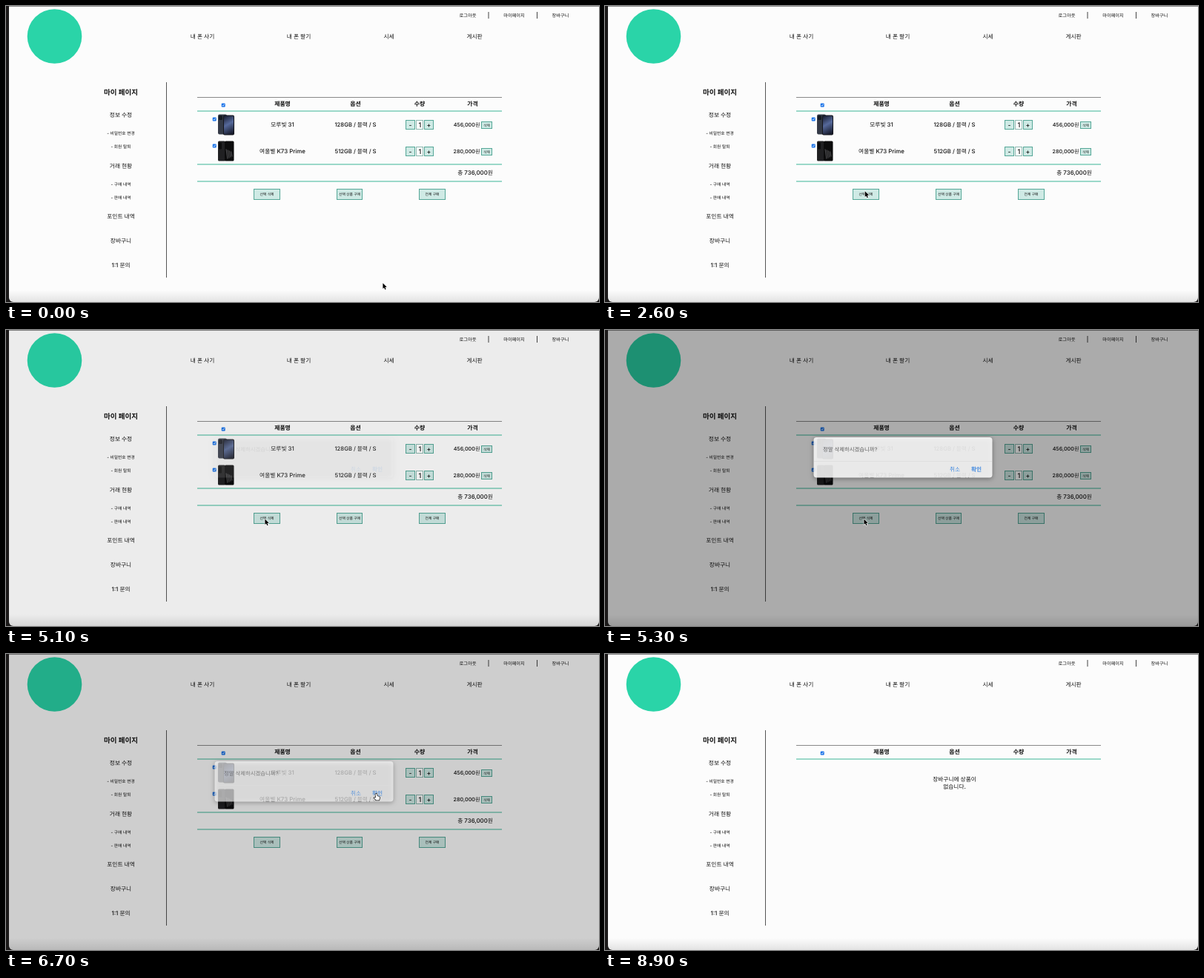
An HTML page with a canvas for the animation above (9500 ms loop, 800x400 px).

```html
<!DOCTYPE html>
<html lang="ko">
<head>
<meta charset="utf-8">
<title>장바구니</title>
<style>
html, body { margin: 0; width: 100%; height: 100%; overflow: hidden; background: #1b1919; }
canvas { display: block; width: 800px; height: 400px; }
</style>
</head>
<body>
<canvas id="stage"></canvas>
<script>
const LOOP = 9500, STEP = 100;
const INK = '#111', LINE = '#3cb698', TINT = '#cfeae5', EDGE = '#55a797', BLUE = '#1a73e8';
const LATIN = 'Inter, "Open Sans", sans-serif';
const HANGUL = '"Noto Sans CJK KR", "Noto Sans CJK", sans-serif';

const canvas = document.getElementById('stage');
const ctx = canvas.getContext('2d');
const ratio = window.devicePixelRatio || 1;
canvas.width = 800 * ratio;
canvas.height = 400 * ratio;

const clamp = v => Math.max(0, Math.min(1, v));
const smooth = (t, from, to) => {
  const u = clamp((t - from) / (to - from));
  return u * u * (3 - 2 * u);
};

// Pointer tip: time, x, y
const path = [
  [0, 508, 374], [400, 449, 308], [600, 449, 308], [1500, 396, 249],
  [1800, 396, 249], [2800, 345, 250], [3600, 342.5, 249], [4200, 350, 259],
  [4700, 349, 255], [5400, 349, 255], [6300, 499, 189], [7700, 499, 189],
  [8300, 481, 143], [8400, 481, 143], [8700, 477, 0]
];

function pointerAt(t) {
  let i = 0;
  while (i < path.length - 2 && t > path[i + 1][0]) i++;
  const [t0, x0, y0] = path[i], [t1, x1, y1] = path[i + 1];
  const u = smooth(t, t0, t1);
  return [x0 + (x1 - x0) * u, y0 + (y1 - y0) * u];
}

function rect(x, y, w, h, fill, stroke) {
  ctx.fillStyle = fill;
  ctx.fillRect(x, y, w, h);
  if (stroke) {
    ctx.strokeStyle = stroke;
    ctx.lineWidth = 1;
    ctx.strokeRect(x + .5, y + .5, w - 1, h - 1);
  }
}

function round(x, y, w, h, r, fill) {
  ctx.beginPath();
  ctx.roundRect(x, y, w, h, r);
  ctx.fillStyle = fill;
  ctx.fill();
}

function poly(points, fill, stroke, width) {
  ctx.beginPath();
  points.forEach(([x, y]) => ctx.lineTo(x, y));
  ctx.closePath();
  ctx.lineJoin = 'round';
  ctx.lineWidth = width;
  ctx.strokeStyle = stroke;
  ctx.stroke();
  ctx.fillStyle = fill;
  ctx.fill();
}

// Hangul runs are set slightly smaller than Latin runs; y is the middle of the line.
function text(str, x, y, size = 8.2, { weight = 500, color = INK, align = .5 } = {}) {
  const runs = str.match(/[가-힣]+|[^가-힣]+/g).map(s => {
    const font = /[가-힣]/.test(s)
      ? `${weight} ${size * .94}px ${HANGUL}`
      : `${weight} ${size * .96}px ${LATIN}`;
    ctx.font = font;
    return { s, font, w: ctx.measureText(s).width };
  });
  x -= align * runs.reduce((sum, r) => sum + r.w, 0);
  ctx.fillStyle = color;
  for (const r of runs) {
    ctx.font = r.font;
    ctx.fillText(r.s, x, y + size * .35);
    x += r.w;
  }
}

function checkbox(x, y) {
  round(x - 2.5, y - 2.5, 5, 5, 1, BLUE);
  ctx.beginPath();
  ctx.moveTo(x - 1.4, y);
  ctx.lineTo(x - .4, y + 1.1);
  ctx.lineTo(x + 1.5, y - 1.3);
  ctx.lineWidth = .8;
  ctx.strokeStyle = '#fff';
  ctx.stroke();
}

function button(label, x, y, w, h, size) {
  rect(x, y, w, h, TINT, EDGE);
  text(label, x + w / 2, y + h / 2, size);
}

function pairPhoto(x, y) {
  round(x, y, 12, 27, 2, '#343a47');
  round(x + 1, y + 1.5, 5, 6, 1.5, '#171a22');
  round(x + 7, y + 1, 15, 27, 2, '#15161c');
  const glow = ctx.createLinearGradient(x + 8, y + 4, x + 20, y + 25);
  glow.addColorStop(0, '#20263d');
  glow.addColorStop(.45, '#56699b');
  glow.addColorStop(1, '#171b2c');
  round(x + 8, y + 2, 13, 25, 1.5, glow);
}

function darkPhoto(x, y) {
  round(x, y, 10, 27, 1.5, '#202022');
  round(x + 1, y + 2, 4, 9, 1, '#0b0b0c');
  round(x + 9, y, 12.5, 27, 1.5, '#0c0c0d');
  ctx.strokeStyle = '#77777a';
  ctx.lineWidth = .7;
  ctx.beginPath();
  for (let i = 0; i < 4; i++) {
    ctx.moveTo(x + 11 + i * 2.2, y + 11 + i);
    ctx.lineTo(x + 13 + i * 2, y + 24 - i);
  }
  ctx.stroke();
}

function row(y, photo, name, option, price) {
  checkbox(281.2, y - 7);
  photo(286, y - 13.5);
  text(name, 373, y);
  text(option, 471.5, y, 8);
  button('-', 539, y - 6, 13, 13, 9);
  rect(553, y - 6, 10, 13, '#fff', '#8cb8b0');
  text('1', 558.5, y + .5, 9.5);
  button('+', 564, y - 6, 13, 13, 9);
  text(price, 621.5, y, 7.5);
  button('삭제', 641, y - 4, 15, 10, 4.9);
}

function frame() {
  rect(0, 0, 800, 400, '#1b1919');
  rect(4, 0, 796, 1, '#8a8a8a');
  round(4, 1, 796, 399, [0, 0, 6, 6], '#fcfcfc');
  const shade = ctx.createLinearGradient(0, 384, 0, 400);
  shade.addColorStop(0, 'rgba(0,0,0,0)');
  shade.addColorStop(1, 'rgba(0,0,0,.1)');
  round(4, 384, 796, 16, [0, 0, 6, 6], shade);
}

function header() {
  ctx.beginPath();
  ctx.arc(65.5, 41, 36.8, 0, Math.PI * 2);
  ctx.fillStyle = '#2ad4a8';
  ctx.fill();

  text('로그아웃', 623, 12.5, 6.6);
  text('마이페이지', 685.5, 12.5, 6.6);
  text('장바구니', 748, 12.5, 6.6);
  rect(650.5, 8, 1, 9, '#444');
  rect(716, 8, 1, 9, '#444');

  text('내 폰 사기', 265, 41);
  text('내 폰 팔기', 395, 41);
  text('시세', 516.5, 41);
  text('게시판', 632, 41);
}

function sidebar() {
  text('마이 페이지', 155, 116.5, 10.1, { weight: 700 });
  [['정보 수정', 147], ['거래 현황', 216], ['포인트 내역', 284.5], ['장바구니', 317.5], ['1:1 문의', 350.5]]
    .forEach(([s, y]) => text(s, 155, y));
  [['- 비밀번호 변경', 172], ['- 회원 탈퇴', 190], ['- 구매 내역', 241], ['- 판매 내역', 259]]
    .forEach(([s, y]) => text(s, 155, y, 6.1));
  rect(216, 103, 1, 264, '#555');
}

function cart(full) {
  rect(258, 123, 411, 1, '#888');
  rect(258, 141.5, 411, 1, LINE);
  checkbox(293.2, 134);
  [['제품명', 373], ['옵션', 471.5], ['수량', 558], ['가격', 629.5]]
    .forEach(([s, x]) => text(s, x, 132.5, 8.4, { weight: 700 }));

  if (!full) {
    text('장바구니에 상품이', 471.5, 169.5);
    text('없습니다.', 471.5, 179.5);
    return;
  }
  row(160, pairPhoto, '모루빛 31', '128GB / 블랙 / S', '456,000원');
  row(196, darkPhoto, '여울별 K73 Prime', '512GB / 블랙 / S', '280,000원');
  rect(258, 213.5, 411, 1, LINE);
  text('총 736,000원', 633, 225.5, 8.2);
  rect(258, 236.5, 411, 1, LINE);
  button('선택 삭제', 334, 247, 36, 15, 5.1);
  button('선택 상품 구매', 446, 247, 35, 15, 5.1);
  button('전체 구매', 557, 247, 36, 15, 5.1);
}

function dialog(alpha) {
  if (alpha <= 0) return;
  ctx.save();
  ctx.globalAlpha = alpha;
  ctx.shadowColor = 'rgba(0,0,0,.45)';
  ctx.shadowBlur = 6 * ratio;
  ctx.shadowOffsetY = 1.5 * ratio;
  round(281.5, 145, 241, 54.5, 4, '#fff');
  ctx.shadowColor = 'transparent';
  rect(282, 177, 240, 1, '#dedede');
  text('정말 삭제하시겠습니까?', 294, 161.5, 7.8, { weight: 400, color: '#444', align: 0 });
  text('취소', 472, 188.5, 8.1, { color: '#2277dd' });
  text('확인', 501, 188.5, 8.1, { weight: 700, color: '#2277dd' });
  ctx.restore();
}

function pointer(t) {
  if (t >= 8800) return;
  const [x, y] = pointerAt(t);
  ctx.save();
  ctx.translate(x, y);
  if (t >= 6200 && t < 7100) {
    poly([[0, 0], [1.2, 0], [1.8, 3], [4.6, 3.8], [5.2, 5], [4.4, 8.6], [.4, 8.6],
      [-2.3, 5.4], [-1.7, 4.6], [0, 5.4], [-.6, .6]], '#fff', '#111', 1.4);
  } else {
    poly([[.4, .4], [.4, 8], [2.1, 6.5], [3.3, 9.3], [4.6, 8.7], [3.4, 6], [5.7, 5.8]], '#000', '#fff', 1.2);
  }
  ctx.restore();
}

function draw(t) {
  ctx.setTransform(ratio, 0, 0, ratio, 0, 0);
  ctx.textRendering = 'geometricPrecision';
  frame();
  header();
  sidebar();
  cart(t < 7100);

  const open = smooth(t, 5000, 5380);
  const dim = .365 * open * (1 - smooth(t, 6600, 6800));
  if (dim > 0) round(4, 0, 796, 400, [0, 0, 6, 6], `rgba(0,0,0,${dim})`);
  dialog(open ** 1.3 * (1 - smooth(t, 6600, 6850)));
  pointer(t);
}

const start = performance.now();
function tick() {
  const t = (performance.now() - start) % LOOP;
  draw(Math.floor(t / STEP) * STEP);
  requestAnimationFrame(tick);
}
tick();
</script>
</body>
</html>
```
